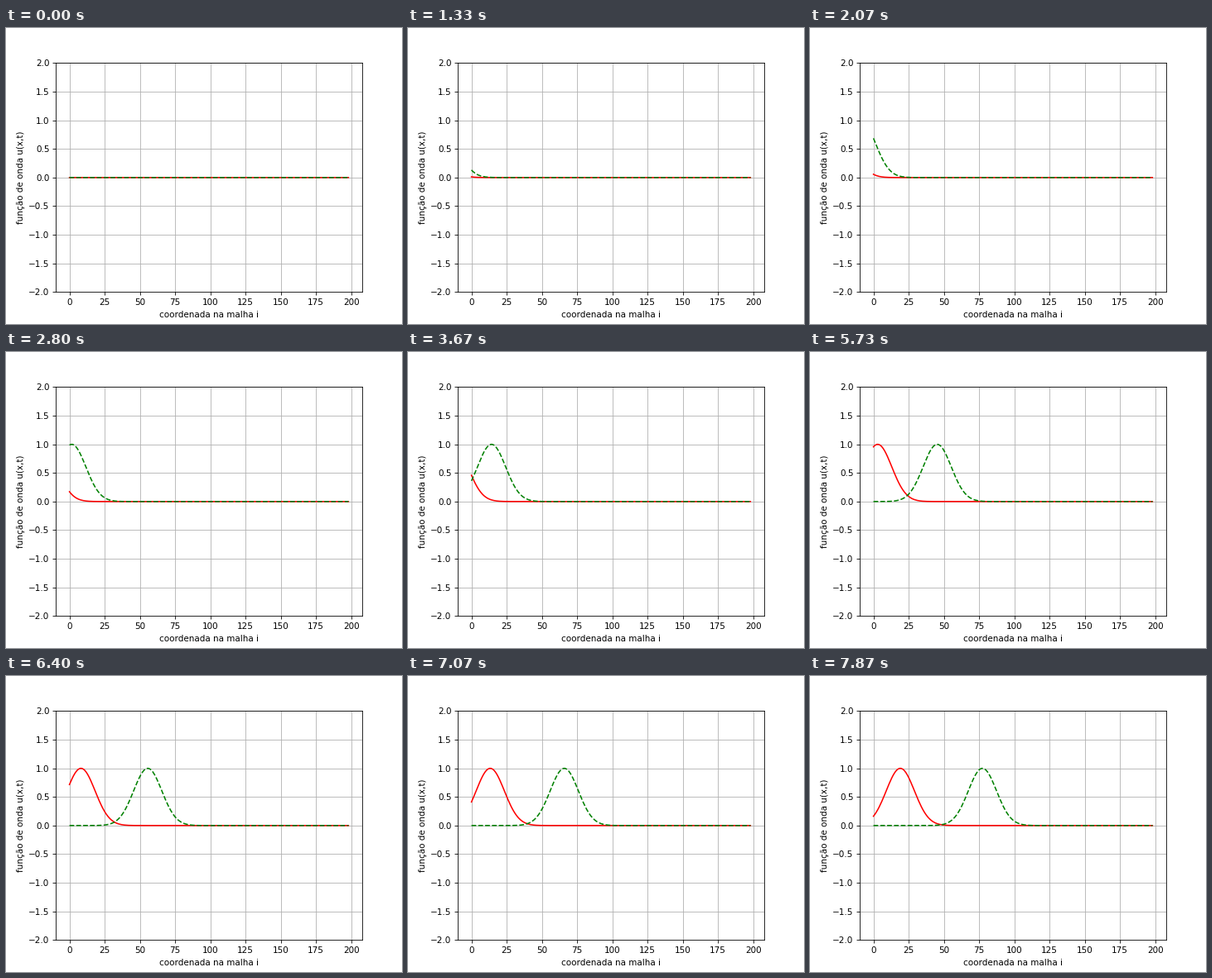
These frames come from a looping animation (478x358 px, 8000 ms). A matplotlib script:

```python
import numpy as np
import matplotlib.pyplot as plt
from matplotlib.animation import FuncAnimation

W, H, DPI = 478, 358, 74.6875
FRAMES, LOOP_MS = 200, 8000

# Ticks (15 per second) on which the picture stands still.
HOLDS = np.array([9, 15, 21, 33, 39, 43, 51, 63, 69, 75, 81, 93, 99,
                  113, 114, 119])
SIGMA = 10
FAST, SLOW = 1.147, 0.5735  # mesh cells per step

x = np.arange(199)


def pulse(center):
    return np.exp(-(x - center) ** 2 / (2 * SIGMA ** 2))


fig = plt.figure(figsize=(W / DPI, (H + 0.001) / DPI), dpi=DPI,
                 facecolor="white")
ax = fig.add_axes([0.125, 38.7 / H, 0.775, 276.9 / H])
slow, = ax.plot(x, 0 * x, "r-", lw=1.5)
fast, = ax.plot(x, 0 * x, "g--", lw=1.5)
ax.set_xlim(-9.9, 207.9)
ax.set_ylim(-2, 2)
ax.set_xticks(range(0, 201, 25))
ax.set_yticks(np.arange(-2, 2.1, 0.5))
ax.set_xlabel("coordenada na malha i", labelpad=5.2)
ax.set_ylabel("função de onda u(x,t)")
ax.grid(True)


def update(frame):
    tick = (3 * frame + 2) // 5
    step = tick - np.count_nonzero(HOLDS <= tick)
    slow.set_ydata(pulse(SLOW * step - 40))
    fast.set_ydata(pulse(FAST * step - 40.8))
    return slow, fast


anim = FuncAnimation(fig, update, frames=FRAMES, interval=LOOP_MS / FRAMES,
                     init_func=lambda: update(0), repeat=True, repeat_delay=0)
plt.show()
```
